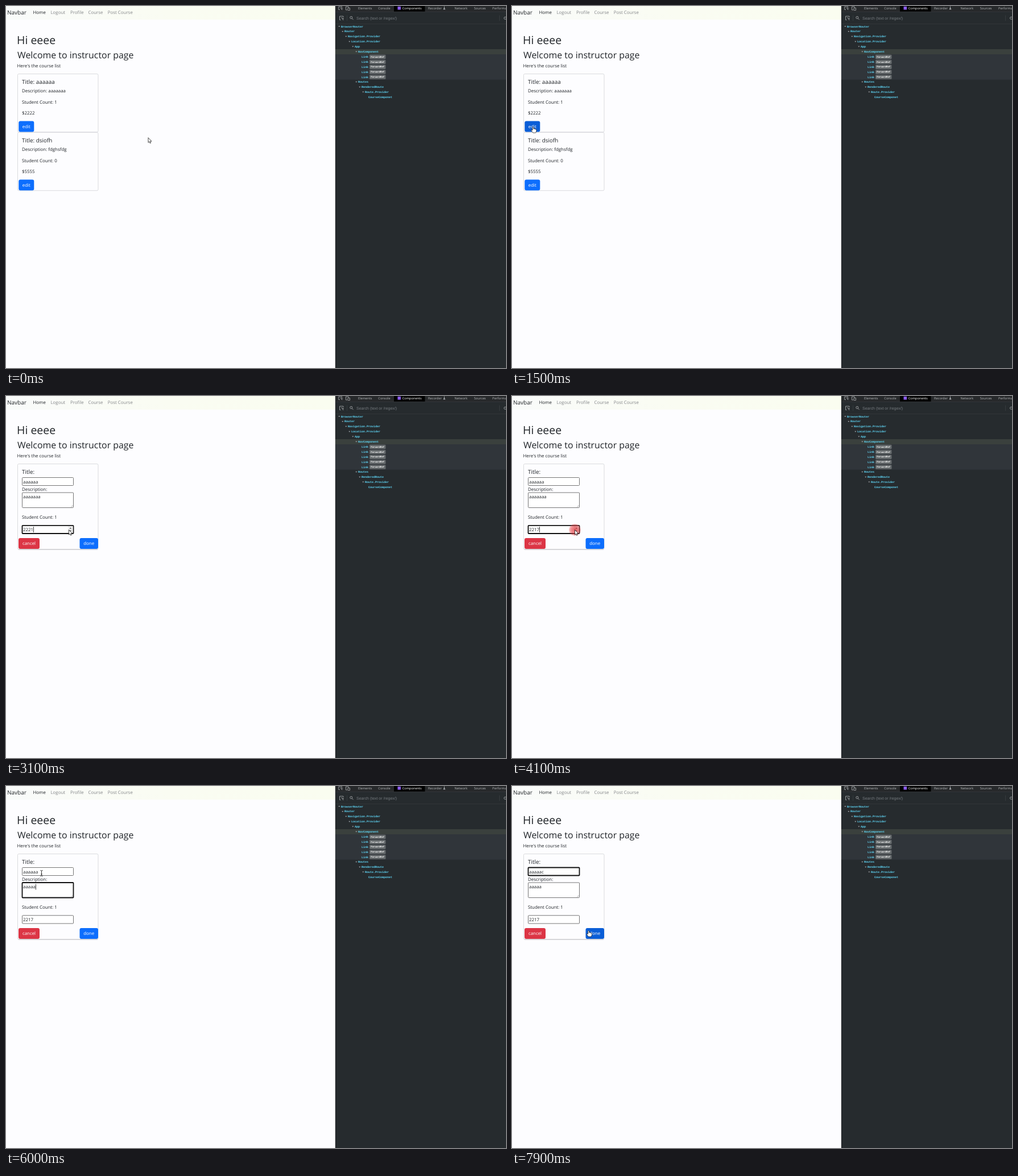
Animation, 879 px wide and 637 px high, one loop 8000 ms. Source, as an HTML page:

```html
<!DOCTYPE html>
<html lang="en">
<head>
<meta charset="utf-8">
<title>Course editor</title>
<style>
html, body { margin: 0; width: 100%; height: 100%; overflow: hidden; background: #fdfdff; }
svg { display: block; width: 879px; height: 637px; text-rendering: geometricPrecision; }
text { font-family: "Open Sans", "Noto Sans", sans-serif; font-size: 7.9px; fill: #212529; white-space: pre; }
.muted { fill: #85878a; }
.title { font-size: 9.9px; }
.btn { fill: #fff; text-anchor: middle; }
.card { fill: none; stroke: #dadbde; }
.field { fill: #fff; stroke: #767676; }
.field.focus { stroke: #101010; stroke-width: 1.8; }
.tab { font-size: 5.7px; fill: #b4b6b8; }
.node { font: bold 5px "Liberation Mono", "DejaVu Sans Mono", monospace; fill: #61dafb; }
.badge { font: bold 4px "Liberation Mono", "DejaVu Sans Mono", monospace; fill: #fff; }
.icon { fill: none; stroke: #a2a5a8; stroke-width: .9; }
.blue { fill: #0d6efd; }
.blue.hover { fill: #0b5ed7; }
.red { fill: #dc3545; }
</style>
</head>
<body>
<svg viewBox="0 0 879 637">
  <defs>
    <linearGradient id="nav"><stop stop-color="#f9fbfa"/><stop offset=".5" stop-color="#fafcf2"/><stop offset="1" stop-color="#fafdf0"/></linearGradient>
    <radialGradient id="glow"><stop stop-color="#e0252d" stop-opacity=".72"/><stop offset=".65" stop-color="#e5363c" stop-opacity=".55"/><stop offset="1" stop-color="#e8484c" stop-opacity=".28"/></radialGradient>
  </defs>
  <rect width="879" height="637" fill="#fdfdff"/>
  <rect width="579" height="24" fill="url(#nav)"/>
  <text x="2" y="14.5" style="font-size:10px">Navbar</text>
  <text x="47.5" y="14">Home</text>
  <g id="links"></g>
  <text x="19" y="67" style="font-size:19.5px">Hi eeee</text>
  <text x="20" y="92" style="font-size:15.9px">Welcome to instructor page</text>
  <text x="19.5" y="108">Here's the course list</text>

  <g id="list"></g>

  <g id="form">
    <rect class="card" x="20.5" y="119.5" width="141.5" height="150.5" rx="2"/>
    <path d="M22 270H161" stroke="#bfc0c4"/>
    <text class="title" x="28" y="136.5">Title:</text>
    <rect id="titleBox" class="field" x="28.5" y="143.5" width="90" height="14" rx="1"/>
    <text id="titleText" x="30" y="153.5"></text>
    <text x="28" y="166.8">Description:</text>
    <rect id="descBox" class="field" x="28.5" y="170" width="90" height="26.5" rx="1"/>
    <path d="M114 195.5L117.5 192M116 195.5L117.5 194" stroke="#888" stroke-width=".6"/>
    <text id="descText" x="30" y="180.3"></text>
    <text x="28" y="216.3">Student Count: 1</text>
    <rect id="priceBox" class="field" x="28.5" y="227.8" width="90" height="14.2" rx="1"/>
    <text id="priceText" x="30" y="237.7"></text>
    <g id="spinner">
      <rect x="109" y="229" width="8.5" height="12" fill="#efefef"/>
      <path d="M111.3 233.6l2-2 2 2zM111.3 236.4l2 2 2-2z" fill="#555"/>
    </g>
    <rect id="caret" width=".8" height="10" fill="#111"/>
    <rect class="red" x="22" y="250" width="37" height="19" rx="3"/>
    <text class="btn" x="40.5" y="262.3">cancel</text>
    <rect id="done" class="blue" x="129.5" y="250" width="32.5" height="19" rx="3"/>
    <text class="btn" x="145.7" y="262.3">done</text>
  </g>

  <g id="panel">
    <rect x="579" width="300" height="637" fill="#262b2e"/>
    <rect x="579" width="300" height="10" fill="#27292b"/>
    <rect x="682" width="54.5" height="10" fill="#000"/>
    <path d="M579 10.2H879M579 31.6H879" stroke="#383c3f" stroke-width=".7"/>
    <path d="M579.3 0V637" stroke="#1b1e20" stroke-width=".8"/>
    <path class="icon" d="M587 6.5H584.8V1H590.5V3M587.5 3.2l4 1.5-2 .6 1.6 1.8M597.5 1H602V3M597.5 1V7H600M601 3.5H604.5V7.5H601Z"/>
    <path class="icon" d="M588.5 24.5H586.5V18H593V20M589 20.5l4.5 1.7-2 .7 1.6 2.2"/>
    <circle class="icon" cx="606.8" cy="20.3" r="2"/>
    <path class="icon" d="M608.3 21.8l2.3 2.4"/>
    <path d="M599.5 16.5V26M867.5 16.5V26" stroke="#3d4246" stroke-width=".7"/>
    <text x="616" y="23.8" style="font:6.95px 'Liberation Sans',sans-serif;fill:#777c81">Search (text or /regex/)</text>
    <circle class="icon" cx="877.5" cy="21.3" r="2" stroke-width="1.5"/>
    <path d="M768.5 6.2L770 3V.8H771V3L772.5 6.2Z" fill="#a2a5a8"/>
    <rect x="688.5" y="1" width="5.5" height="5.5" fill="#8b5cf0"/>
    <rect x="579" y="76" width="300" height="9" fill="#3a403d"/>
    <rect x="579" y="85" width="300" height="44.6" fill="#30353a"/>
  </g>

  <circle id="click" r="10.5" fill="url(#glow)"/>
  <g id="pointer">
    <path id="arrow" d="M0 0V8.6L1.9 6.9L3.2 9.8L4.6 9.2L3.4 6.4H6Z" fill="#fff" stroke="#111" stroke-width=".75"/>
    <path id="hand" d="M-1 .8Q0-.8 1 .8V4Q2-.1 3 4.2Q4 3.2 4.6 4.6Q6.2 4.2 6 6Q6 9 4.6 10.6H0Q-2.6 8-3.4 5.8Q-2.4 4.6-1 6.2Z" fill="#fff" stroke="#111" stroke-width=".7"/>
    <path id="beam" d="M-2.2-4.8H-.6L0-4.3L.6-4.8H2.2M0-4.3V4.3M-2.2 4.8H-.6L0 4.3L.6 4.8H2.2M-1.3 1.6H1.3" fill="none" stroke="#222" stroke-width=".9"/>
  </g>
</svg>
<script>
const $ = id => document.getElementById(id);
const add = (id, markup) => $(id).insertAdjacentHTML('beforeend', markup);
const text = (cls, x, y, s) => `<text class="${cls}" x="${x}" y="${y}">${s}</text>`;
const a = n => 'a'.repeat(n);

[['Logout', 78.5], ['Profile', 113], ['Course', 144.5], ['Post Course', 178.7]]
  .forEach(([s, x]) => add('links', text('muted', x, 14, s)));

[[a(6), a(7), 1, 2222], ['dsiofh', 'fdghsfdg', 0, 5555]].forEach(([title, desc, count, price], i) => {
  add('list', `<g transform="translate(0 ${i * 103})">
    <rect class="card" x="20.5" y="119.5" width="141.5" height="102.3" rx="2"/>
    ${text('title', 28, 136.5, 'Title: ' + title)}
    ${text('', 28, 152, 'Description: ' + desc)}
    ${text('', 28, 171.8, 'Student Count: ' + count)}
    ${text('', 28, 191.4, '$' + price)}
    <rect id="edit${i}" class="blue" x="22.3" y="202.5" width="27" height="19" rx="3"/>
    ${text('btn', 35.8, 215, 'edit')}</g>`);
});

[['Elements', 619], ['Console', 654.3], ['Components', 696.7], ['Recorder', 742], ['Network', 788.5], ['Sources', 822.7], ['Performance', 855]]
  .forEach(([s, x]) => add('panel', `<text class="tab" x="${x}" y="5.8"${s === 'Components' ? ' style="fill:#fff"' : ''}>${s}</text>`));

const link = ['Link', 6];
[['BrowserRouter', 0], ['Router', 1], ['Navigation.Provider', 2], ['Location.Provider', 3], ['App', 4], ['NavComponent', 5],
  link, link, link, link, link, ['Routes', 5], ['RenderedRoute', 6], ['Route.Provider', 7], ['CourseComponet', 8]]
  .forEach(([s, depth], i) => {
    const x = 589 + depth * 6, y = 36 + i * 8.89;
    add('panel', text('node', x, y + 1.6, s));
    if (s === 'Link')
      add('panel', `<rect x="639" y="${y - 3.6}" width="28.5" height="7.4" rx="1.3" fill="#656a6c"/>` + text('badge', 641.2, y + 1.3, 'ForwardRef'));
    else if (depth < 8)
      add('panel', `<path d="M${x - 4.7} ${y - 1}h3l-1.5 2z" fill="#a0a4a8"/>`);
  });

// Pointer stops: time, x, y
const path = [
  [0, 250, 231.7], [900, 32, 208], [1100, 36.5, 212], [1400, 36.5, 212], [1500, 37, 212.5], [1900, 38, 213],
  [2200, 56, 216.3], [2400, 60, 228], [2700, 146, 244], [3000, 110.5, 235.5], [4200, 110.5, 235.5],
  [4500, 146, 247], [4900, 76, 180], [5300, 76, 180], [5700, 66, 170], [6000, 62.5, 153.5], [6100, 62.5, 153.5],
  [6300, 104, 184], [6400, 75, 171], [6900, 75, 171], [7000, 69.5, 161], [7200, 69, 158], [7500, 69, 158], [7900, 134.5, 254.5]
];
const clicks = [[1600, 1800], [2900, 3100], [3200, 4200], [4900, 5100], [6100, 6200]];
const within = (t, from, to) => t >= from && t < to;
const show = (id, on) => $(id).style.display = on ? '' : 'none';

function place(t) {
  const i = path.findIndex(p => p[0] > t);
  if (i < 0) return path[path.length - 1].slice(1);
  const [t0, x0, y0] = path[i - 1], [t1, x1, y1] = path[i];
  let k = (t - t0) / (t1 - t0);
  k = k * k * (3 - 2 * k);
  return [x0 + (x1 - x0) * k, y0 + (y1 - y0) * k];
}

function shapeAt(t, x, y) {
  const onEdit = t < 1900 && x < 49 && y < 222;
  if (onEdit || t >= 7900) return 'hand';
  if (t < 1900 || within(t, 2500, 4700)) return 'arrow';
  return 'beam';
}

function draw(now) {
  const t = Math.floor(now % 8000 / 100) * 100;
  const [x, y] = place(t), shape = shapeAt(t, x, y), editing = t >= 1900;
  show('list', !editing);
  show('form', editing);
  $('edit0').classList.toggle('hover', shape === 'hand');
  $('done').classList.toggle('hover', t >= 7900);

  const focus = within(t, 3000, 4900) ? 'price' : within(t, 4900, 6100) ? 'desc' : t >= 6100 ? 'title' : '';
  const drops = Math.max(0, Math.min(5, Math.floor((t - 2900) / 200)));
  const values = {
    title: t < 6200 ? a(6) : a(5) + (t >= 7400 ? 'c' : ''),
    desc: a(t < 5500 ? 7 : t < 5700 ? 6 : 5),
    price: String(2222 - drops)
  };
  for (const name in values) {
    $(name + 'Text').textContent = values[name];
    $(name + 'Box').classList.toggle('focus', name === focus);
  }
  show('spinner', within(t, 2900, 4400));

  const blinkOff = within(t, 6600, 7100) || t >= 7900;
  show('caret', focus && !blinkOff);
  if (focus) {
    $('caret').setAttribute('x', 30 + $(focus + 'Text').getComputedTextLength());
    $('caret').setAttribute('y', { title: 145.5, desc: 172.5, price: 230 }[focus]);
  }

  show('click', clicks.some(c => within(t, ...c)));
  $('click').setAttribute('cx', x);
  $('click').setAttribute('cy', y);
  $('pointer').setAttribute('transform', `translate(${x} ${y})`);
  for (const s of ['arrow', 'hand', 'beam']) show(s, s === shape);
  requestAnimationFrame(draw);
}
draw(performance.now());
</script>
</body>
</html>
```
